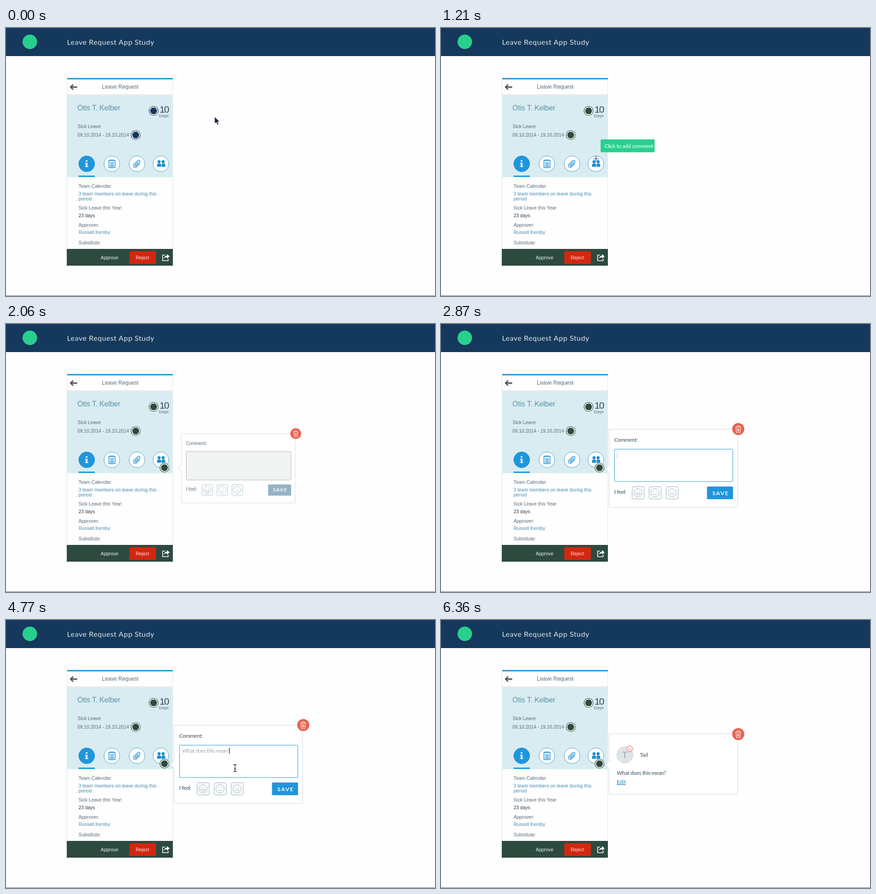
Animation of 946x592 px, one loop 6.71 s. Source, as an HTML page:

```html
<!DOCTYPE html>
<html lang="en">
<head>
<meta charset="utf-8">
<title>Leave Request App Study</title>
<style>
  html, body { margin: 0; width: 100%; height: 100%; overflow: hidden; background: #fefefe; }
  svg { display: block; width: 946px; height: 592px; }
  text { font-family: "Liberation Sans", Arial, sans-serif; font-size: 10.45px; fill: #5b6b78; }
  .lato { font-family: Lato, sans-serif; font-size: 12px; letter-spacing: -.4px; fill: #35515f; }
  .link { fill: #4a8aab; }
  .line { fill: none; stroke: #2191d4; stroke-width: 1.5; }
  .panel { fill: #fff; stroke: #cfd8dc; }
  .face { fill: none; stroke: #8eabb8; stroke-width: 1; }

  /* one loop: 6710 ms */
  .a { animation: 6.71s linear infinite; }
  .step { animation-timing-function: step-end; }

  #pins { animation-name: pins; }
  @keyframes pins { 0% { fill: #14365c; stroke: #14365c } 8.05%, 100% { fill: #2d4a3f; stroke: #2d4a3f } }

  #cursor { animation-name: move; }
  @keyframes move {
    0%, 8.05% { transform: translate(460px, 196px); animation-timing-function: ease-in-out }
    18.03%, 18.48% { transform: translate(342px, 289px); animation-timing-function: ease-in-out }
    22.2%, 50% { transform: translate(349.5px, 317.5px); animation-timing-function: step-end }
    60%, 75.56% { transform: translate(505px, 327px); animation-timing-function: ease-in-out }
    79.43%, 85.84% { transform: translate(507px, 377px); animation-timing-function: ease-in-out }
    89.42%, 100% { transform: translate(614px, 373px) }
  }
  #arrow { animation-name: arrow; }
  @keyframes arrow { 0% { opacity: 1 } 13.19%, 100% { opacity: 0 } }
  #cross { animation-name: cross; }
  @keyframes cross { 0% { opacity: 0 } 13.19% { opacity: 1 } 24.3%, 100% { opacity: 0 } }
  #ibeam { animation-name: ibeam; }
  @keyframes ibeam { 0% { opacity: 0 } 69% { opacity: 1 } 78.5%, 100% { opacity: 0 } }
  #hand { animation-name: hand; }
  @keyframes hand { 0% { opacity: 0 } 78.5% { opacity: 1 } 92.4%, 100% { opacity: 0 } }
  #tip { animation-name: tip; }
  @keyframes tip { 0%, 13.19% { opacity: 0 } 15%, 22.5% { opacity: 1 } 24%, 100% { opacity: 0 } }

  .ripple { fill: none; stroke: #c8dfe5; opacity: .42; }
  #tapPin { animation-name: tapPin; }
  @keyframes tapPin {
    0%, 22.5% { r: 0; stroke-width: 0 } 22.55% { r: 4px; stroke-width: 8px }
    24.3% { r: 23px; stroke-width: 9px } 26.83%, 100% { r: 28px; stroke-width: 0 }
  }
  #tapFace { animation-name: tapFace; }
  @keyframes tapFace {
    0%, 80.4% { r: 0; stroke-width: 0 } 80.48% { r: 4px; stroke-width: 8px }
    82% { r: 24.5px; stroke-width: 9px } 85.39%, 100% { r: 28.5px; stroke-width: 0 }
  }
  #tapSave { animation-name: tapSave; }
  @keyframes tapSave {
    0%, 89.4% { r: 0; stroke-width: 0 } 89.5% { r: 4px; stroke-width: 8px }
    91.1% { r: 24.5px; stroke-width: 9px } 94.3%, 100% { r: 28.5px; stroke-width: 0 }
  }

  #newPin { animation-name: newPin; }
  @keyframes newPin { 0%, 22.5% { opacity: 0 } 24%, 100% { opacity: 1 } }

  #form, #card { transform-origin: 512px 319px; }
  #form { animation-name: form; }
  @keyframes form {
    0%, 29.06% { transform: scale(.8); opacity: 0 }
    30% { opacity: 1 }
    30.7% { transform: scale(.884) }
    33.98% { transform: none }
    91.2% { opacity: 1 }
    93%, 100% { transform: none; opacity: 0 }
  }
  #fields { animation-name: fields; }
  @keyframes fields { 0%, 29.06% { opacity: .4 } 30.7% { opacity: .8 } 33.98%, 100% { opacity: 1 } }
  #box { animation-name: box; }
  @keyframes box {
    0%, 33.98% { fill: #eff1f0; stroke: #8a9fa3 }
    35.92%, 80% { fill: #fff; stroke: #1f96db }
    81%, 100% { fill: #e9f3f5; stroke: #84aab8 }
  }
  #save { animation-name: save; }
  @keyframes save { 0%, 32% { fill: #77a1b5 } 35.92%, 100% { fill: #1f96db } }
  #sadOn { animation-name: sadOn; }
  @keyframes sadOn { 0%, 80% { opacity: 0 } 81%, 100% { opacity: 1 } }

  #reveal { animation-name: reveal; }
  @keyframes reveal {
    0%, 47.24% { width: 0 } 57.23% { width: 51px } 67.66% { width: 92px } 70.34%, 100% { width: 106px }
  }
  #caret { animation-name: caretX, caretBlink; }
  @keyframes caretX {
    0%, 47.24% { transform: none } 57.23% { transform: translateX(50px) }
    67.66% { transform: translateX(92px) } 70.34%, 100% { transform: translateX(104px) }
  }
  @keyframes caretBlink {
    0%, 34.5% { opacity: 0 } 35.92%, 38.45% { opacity: 1 } 40.24%, 41.7% { opacity: 0 }
    42.77% { opacity: .25 } 45.01%, 100% { opacity: 1 }
  }

  #card { animation-name: card; }
  @keyframes card {
    0%, 91.5% { transform: scale(.88); opacity: 0 } 94.78%, 100% { transform: none; opacity: 1 }
  }
</style>
</head>
<body>
<svg viewBox="0 0 946 592" xmlns="http://www.w3.org/2000/svg">
  <defs>
    <g id="pin">
      <circle r="11" fill="#fff" stroke="none"/>
      <circle r="10" fill="#fff" stroke-width="1.2"/>
      <circle r="7.5" stroke="none"/>
    </g>
    <g id="trash">
      <circle r="13.3" fill="#e86250"/>
      <g fill="none" stroke="#fff" stroke-width="1.1">
        <path d="M-6.5-4.5H6.5M-2.5-4.5V-7H2.5V-4.5M-5.2-4.5-4 8H4L5.2-4.5"/>
        <path d="M-2-1.5-1.5 5.5M0-1.5V5.5M2-1.5 1.5 5.5" stroke-width=".9"/>
      </g>
    </g>
    <g id="key">
      <rect x="-13" y="-13.5" width="26.5" height="27" rx="3" fill="#fff" stroke="#8eabb8"/>
      <circle r="9.3" class="face"/>
      <path class="face" d="M-3.5-3.2v2M3.5-3.2v2" stroke-width="1.4"/>
    </g>
    <clipPath id="typed"><rect id="reveal" class="a" x="388" y="278" width="0" height="22"/></clipPath>
  </defs>

  <rect width="946" height="592" fill="#fefefe"/>
  <rect width="946" height="62" fill="#14395c"/>
  <circle cx="52.5" cy="30.5" r="16" fill="#27d08f"/>
  <text class="lato" x="134.5" y="37" style="font-size:16.2px;letter-spacing:.55px;fill:#dfe6e9">Leave Request App Study</text>
  <rect y="591" width="946" height="1" fill="#60676c"/>

  <!-- phone -->
  <rect x="134.5" y="111" width="233" height="413" fill="#fefefe" stroke="#dfe4e6"/>
  <rect x="135" y="110.5" width="233" height="3" fill="#1f96db"/>
  <rect x="135" y="146.5" width="233" height="3.5" fill="#e4eaeb"/>
  <rect x="134" y="150" width="234" height="179.5" fill="#d9ecf1"/>
  <path d="M142 130.5h15M148 125l-5.5 5.5 5.5 5.5" fill="none" stroke="#4f5963" stroke-width="3"/>
  <text x="211.5" y="134" style="font-size:12px">Leave Request</text>
  <text x="157.5" y="182" style="font-size:15.8px;fill:#5791a9">Otis T. Kelber</text>
  <text x="338.5" y="187" style="font-size:21px;letter-spacing:-1.8px;fill:#36444d">10</text>
  <text x="337.5" y="197" style="font-size:9.3px">Days</text>
  <text x="158" y="220.5">Sick Leave</text>
  <text x="157.5" y="240">09.10.2014 - 19.10.2014</text>

  <g fill="#fff" stroke="#4d9ac3">
    <circle cx="178" cy="300" r="17.5" fill="#1f96db" stroke="#1f96db"/>
    <circle cx="233.5" cy="300" r="17.3"/>
    <circle cx="289" cy="300" r="17.3"/>
    <circle cx="341.5" cy="300" r="17.3"/>
  </g>
  <circle cx="177.7" cy="293.8" r="2" fill="#fff"/>
  <path d="M174.5 298h5v7h1.8v2h-7v-2h1.9v-5h-1.7z" fill="#fff"/>
  <path class="line" d="M227 292.5h13.5v16H227zM229.5 297.5h8.5M229.5 300.5h8.5M229.5 303.5h8.5M229.5 306h8.5"/>
  <path d="M229.5 290v4M232.3 290v4M235.1 290v4M238 290v4" stroke="#2191d4" stroke-width="1.2"/>
  <path class="line" transform="translate(289 300) rotate(45)" d="M4-4V6a4 4 0 0 1-8 0V-6a2.8 2.8 0 0 1 5.6 0V5a1.4 1.4 0 0 1-2.8 0V-4"/>
  <g fill="#1f8ccc">
    <circle cx="337.5" cy="295.5" r="3.4"/>
    <circle cx="346.5" cy="295.5" r="3.4"/>
    <path d="M333 306.5v-4q0-3 3-3h3.500q2.500 0 2.500 3v4zM343 306.500v-4q0-3 2.500-3h3q2.700 0 2.700 3v4z"/>
  </g>
  <rect x="160" y="326" width="36" height="3" fill="#1f96db"/>

  <text x="160" y="352.5">Team Calendar:</text>
  <text class="link" x="160" y="369.5">3 team members on leave during this</text>
  <text class="link" x="160" y="381">period</text>
  <text x="160" y="401">Sick Leave this Year:</text>
  <text x="160" y="417.5" style="fill:#2f3d48">23 days</text>
  <text x="160" y="439">Approver:</text>
  <text class="link" x="160" y="455">Russell Kemby</text>
  <text x="160" y="478">Substitute:</text>

  <rect x="134" y="488" width="234" height="37" fill="#2d4a3f"/>
  <rect x="272" y="493" width="58.5" height="28" rx="2" fill="#d3260f"/>
  <text x="209" y="511" style="fill:#eef2f0">Approve</text>
  <text x="286" y="511" style="fill:#fbe6e2">Reject</text>
  <path d="M351 501.5h-5.5v12.5h12v-4" fill="none" stroke="#fff" stroke-width="1.7"/>
  <path d="M349 509.5q0-6.5 6-6.5v-3.5l6 5-6 5v-3.3q-4 0-6 3.3z" fill="#fff"/>

  <g id="pins" class="a step">
    <use href="#pin" x="325.5" y="183"/>
    <use href="#pin" x="286" y="236.5"/>
  </g>

  <!-- comment form -->
  <g id="form" class="a">
    <path class="panel" d="M370.5 232.5H654V405H370.5V327.5L362 320 370.5 312.5z"/>
    <g id="fields" class="a">
      <text class="lato" x="382" y="260">Comment:</text>
      <rect id="box" class="a" x="382.5" y="276.5" width="261" height="71.5" rx="2"/>
      <text class="lato" x="389" y="293" clip-path="url(#typed)" style="font-size:11.6px;letter-spacing:-.35px;font-weight:300;fill:#4f626d">What does this mean?</text>
      <rect id="caret" class="a" x="388" y="282" width="1.2" height="14" fill="#1d2c36"/>
      <text class="lato" x="382" y="375">I feel:</text>
      <g transform="translate(434.5 373)"><use href="#key"/><path class="face" d="M-5.5 1.5a5.7 5.7 0 0 0 11 0z"/></g>
      <g transform="translate(472 373)"><use href="#key"/><path class="face" d="M-4.5 3.5h9"/></g>
      <g transform="translate(509.5 373)">
        <use href="#key"/><path class="face" d="M-5 5.5a5.3 5.3 0 0 1 10 0"/>
        <g id="sadOn" class="a">
          <rect x="-13.5" y="-14" width="27.5" height="28" rx="3" fill="#d3200f"/>
          <circle r="9.3" fill="#fff"/>
          <path d="M-5 5.5a5.3 5.3 0 0 1 10 0M-3.5-3.5v2.5M3.5-3.5v2.5" fill="none" stroke="#d3200f" stroke-width="1.5"/>
        </g>
      </g>
      <rect id="save" class="a" x="586.5" y="359" width="57.5" height="28" rx="2"/>
      <text class="lato" x="598.5" y="377.5" style="font-weight:700;letter-spacing:1.8px;fill:#fff">SAVE</text>
    </g>
    <use href="#trash" x="655.5" y="232"/>
  </g>

  <!-- saved comment -->
  <g id="card" class="a">
    <path class="panel" d="M370.5 251.5H654V384.5H370.5V327.5L362 320 370.5 312.5z"/>
    <circle cx="405.5" cy="298" r="17.5" fill="#dfe5e7" stroke="#b9c4c8"/>
    <text class="lato" x="405.5" y="305" text-anchor="middle" style="font-size:20px;letter-spacing:0;fill:#8fadbb">T</text>
    <g transform="translate(416.5 284.5)" stroke="#e0523f" fill="none">
      <circle r="6.3" fill="#fff"/>
      <path d="M-3.2 3.5a3.4 3.4 0 0 1 6.4 0M-2.3-2.5v1.5M2.3-2.5v1.5"/>
    </g>
    <text class="lato" x="438.5" y="302">Tad</text>
    <text class="lato" x="387.5" y="342">What does this mean?</text>
    <text class="lato" x="387.5" y="362" text-decoration="underline" style="letter-spacing:-.1px;fill:#1b84bd">Edit</text>
    <use href="#trash" x="655.5" y="252"/>
  </g>

  <circle id="tapPin" class="a ripple" cx="349.5" cy="317" r="0"/>
  <circle id="tapFace" class="a ripple" cx="508" cy="381" r="0"/>
  <circle id="tapSave" class="a ripple" cx="615" cy="375" r="0"/>
  <g id="newPin" class="a" fill="#2d4a3f" stroke="#2d4a3f"><use href="#pin" x="349.5" y="317.5"/></g>

  <g id="cursor" class="a">
    <path id="arrow" class="a step" d="M0 0V15.5L3.6 12.3 6 18 8.7 16.8 6.4 11.3H11z" fill="#10243a" stroke="#fff" stroke-width=".8"/>
    <path id="cross" class="a step" d="M-6 0H6M0-6V6" stroke="#26343c" stroke-width="1.2"/>
    <path id="ibeam" class="a step" d="M-3.5-8Q0-8 0-6Q0-8 3.5-8M0-6V6M-3.5 8Q0 8 0 6Q0 8 3.5 8M-2 2H2" fill="none" stroke="#1b2b3a" stroke-width="1.3"/>
    <g id="hand" class="a step" stroke="#1b2b3a">
      <path d="M-1.5 1Q0-1 1.5 1V6Q3 5 4 6.5Q5.5 5.7 6.3 7.3Q8 6.9 8 9V11.5Q7.5 13.5 6.5 16H-.5Q-1.5 13.5-4.5 9.5Q-4.8 7.5-2.8 8L-1.5 9.5z" fill="#fff" stroke-width="1.1"/>
      <path d="M1 10.5v3.5M3 10.5v3.5M5 10.5v3.5" stroke-width=".9"/>
    </g>
    <g id="tip" class="a">
      <rect x="10" y="-43" width="119" height="28.5" rx="2" fill="#27d08f"/>
      <text class="lato" x="18.5" y="-24" style="letter-spacing:-.35px;fill:#fff">Click to add comment</text>
    </g>
  </g>
</svg>
</body>
</html>
```
